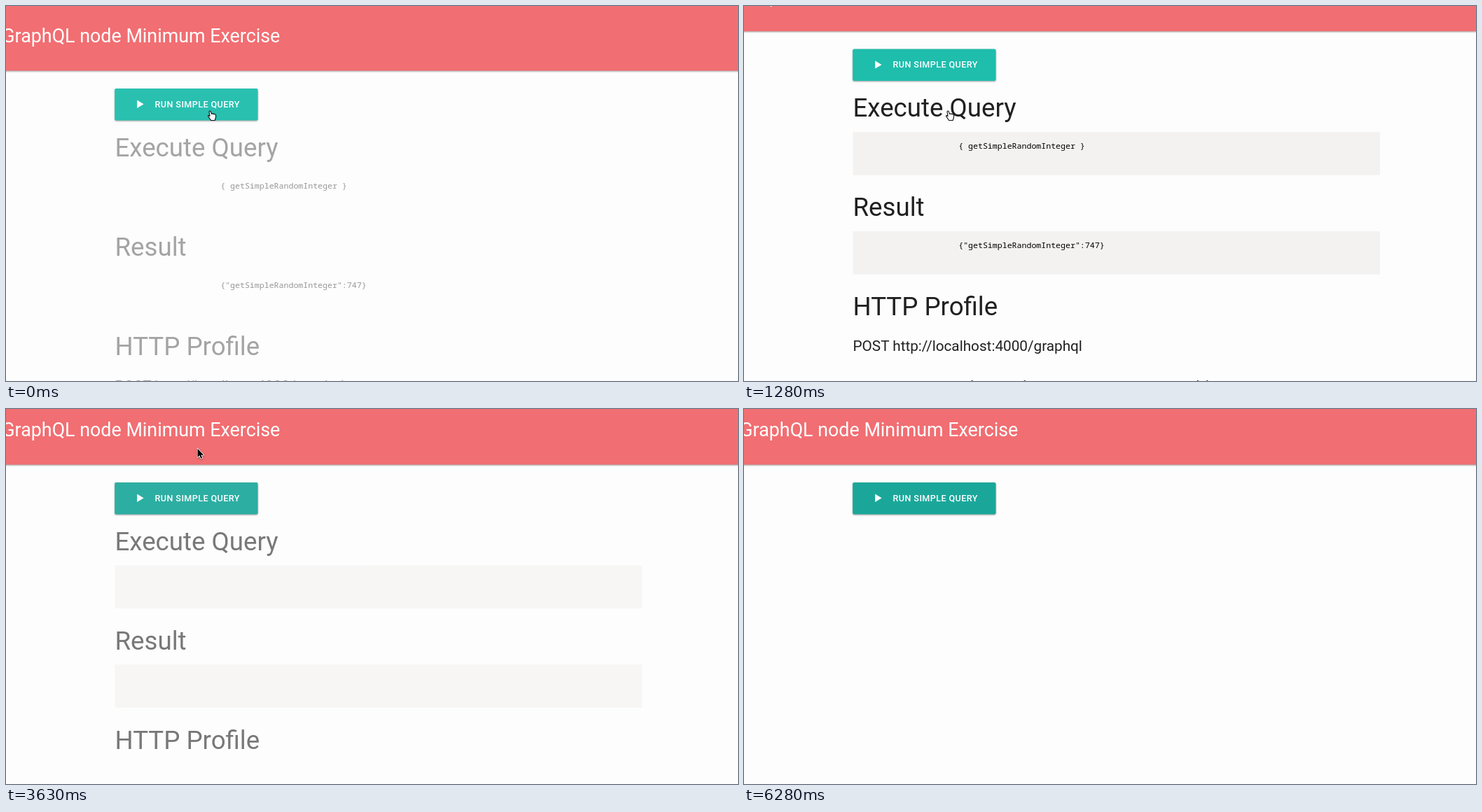
These frames come from a looping animation (1045x536 px, 7600 ms). An HTML page:

```html
<!DOCTYPE html>
<html lang="en">
<head>
<meta charset="utf-8">
<title>Simple query</title>
<style>
  html, body { margin: 0; width: 100%; height: 100%; overflow: hidden; background: #fdfdfd; }
  svg { display: block; width: 1045px; height: 536px; font-family: Roboto, sans-serif; }
  .raised { filter: drop-shadow(0 1.3px 0.9px rgba(0, 0, 0, .38)); }
  .title { font-size: 26.85px; fill: #fff; }
  .label { font-size: 12.56px; font-weight: 500; letter-spacing: .43px; fill: #fff; }
  .head { font-size: 36.68px; fill: #202020; }
  .line { font-size: 20.72px; fill: #202020; }
  .code { font: 11.58px "Noto Sans Mono", monospace; fill: #000; }
  .pointer { stroke-linejoin: round; }
</style>
</head>
<body>
<svg viewBox="0 0 1045 536">
  <defs><clipPath id="face"><rect x="155.2" y="118" width="204.3" height="45.5" rx="2"/></clipPath></defs>
  <g id="page">
    <rect class="raised" x="-10" y="-10" width="1065" height="102.5" fill="#f16e72"/>
    <text class="title" x="-5.7" y="51.5">GraphQL node Minimum Exercise</text>

    <rect id="button" class="raised" x="155.2" y="118" width="204.3" height="45.5" rx="2"/>
    <g clip-path="url(#face)"><circle id="ripple" cx="275" cy="153" fill="#fff"/></g>
    <path d="M187.2 134.6V146L196.6 140.3Z" fill="#fff"/>
    <text class="label" x="212.6" y="144.7">RUN SIMPLE QUERY</text>

    <g id="content">
      <g id="panels" fill="#f4f2f0">
        <rect x="155.5" y="236.5" width="752.5" height="61.5"/>
        <rect x="155.5" y="378.3" width="752.5" height="61.7"/>
      </g>
      <g class="head">
        <text x="155.5" y="214.6">Execute Query</text>
        <text x="155.5" y="356.6">Result</text>
        <text x="155.5" y="498.6">HTTP Profile</text>
      </g>
      <g id="answer">
        <text class="code" x="306.2" y="260.5">{ getSimpleRandomInteger }</text>
        <text class="code" x="306.2" y="402.5">{"getSimpleRandomInteger":747}</text>
        <text class="line" x="155.5" y="549.6">POST http://localhost:4000/graphql</text>
        <text class="line" x="155.5" y="607.6">Request Payload: {query: "{ getSimpleRandomInteger }"}</text>
      </g>
    </g>
  </g>
  <path id="hand" class="pointer" transform="translate(288 149)" fill="#fff" stroke="#111" stroke-width="1.1"
    d="M3 8.5L2 2.2Q2.6 .2 4.2 1.6L5.4 5.4Q6.6 4.2 7.4 5.4Q8.8 4.6 9.4 5.8Q11.2 5.4 11.6 7.5L11.5 10L10.2 14.5H4.6L.6 8.6Q.4 7 2 7.6Z"/>
  <path id="arrow" class="pointer raised" fill="#000" stroke="#fff" stroke-width="1.6" paint-order="stroke"
    d="M0 0V12.2L2.8 9.6L4.8 14L6.7 13.2L4.8 9H8.6Z"/>
</svg>
<script>
const LOOP = 7600, STEP = 150;
const CLICK = 3120, CLEAR = CLICK + 2 * STEP;
const $ = id => document.getElementById(id);

const ramp = (t, from, to) => Math.min(1, Math.max(0, (t - from) / (to - from)));
const within = (t, from, to) => t >= from && t < to;
const set = (id, name, value) => $(id).setAttribute(name, value);
const show = (id, on) => set(id, "visibility", on ? "visible" : "hidden");

function draw(time) {
  const t = Math.max(0, CLICK + Math.floor((time - CLICK) / STEP) * STEP);

  // Scroll down with a small rebound; the cleared page is shorter and jumps back.
  const scroll = t < CLEAR ? 94 * ramp(t, 570, 1570) - ramp(t, 2200, 2500) : 13;
  set("page", "transform", `translate(0 ${-scroll})`);
  set("content", "opacity", (.4 + .6 * ramp(t, 0, 420)) * (1 - ramp(t, 3270, 4020)));
  show("panels", within(t, 420, 1600) || t >= CLEAR);
  show("answer", t < CLEAR);

  const hover = t < 1280 || within(t, 2360, CLEAR);
  set("button", "fill", hover ? "#1ebdac" : "#1aa79a");
  const clicked = t >= CLICK;
  set("ripple", "r", clicked ? 43 + .6 * (t - CLICK) : 240);
  set("ripple", "opacity", clicked ? .12 * (1 - ramp(t, 3270, 4170)) : .05 * (1 - ramp(t, 0, 420)));

  const toButton = ramp(t, 2100, 2520), away = ramp(t, 3780, 4220);
  const x = 291.5 - 18 * toButton + 3 * away;
  const y = 148.7 - 92 * toButton + 105 * away;
  set("arrow", "transform", `translate(${x} ${y})`);
  show("hand", t < 1280);
  show("arrow", within(t, 1280, 5400));
}

const start = performance.now();
function loop() {
  draw((performance.now() - start) % LOOP);
  requestAnimationFrame(loop);
}
loop();
</script>
</body>
</html>
```
